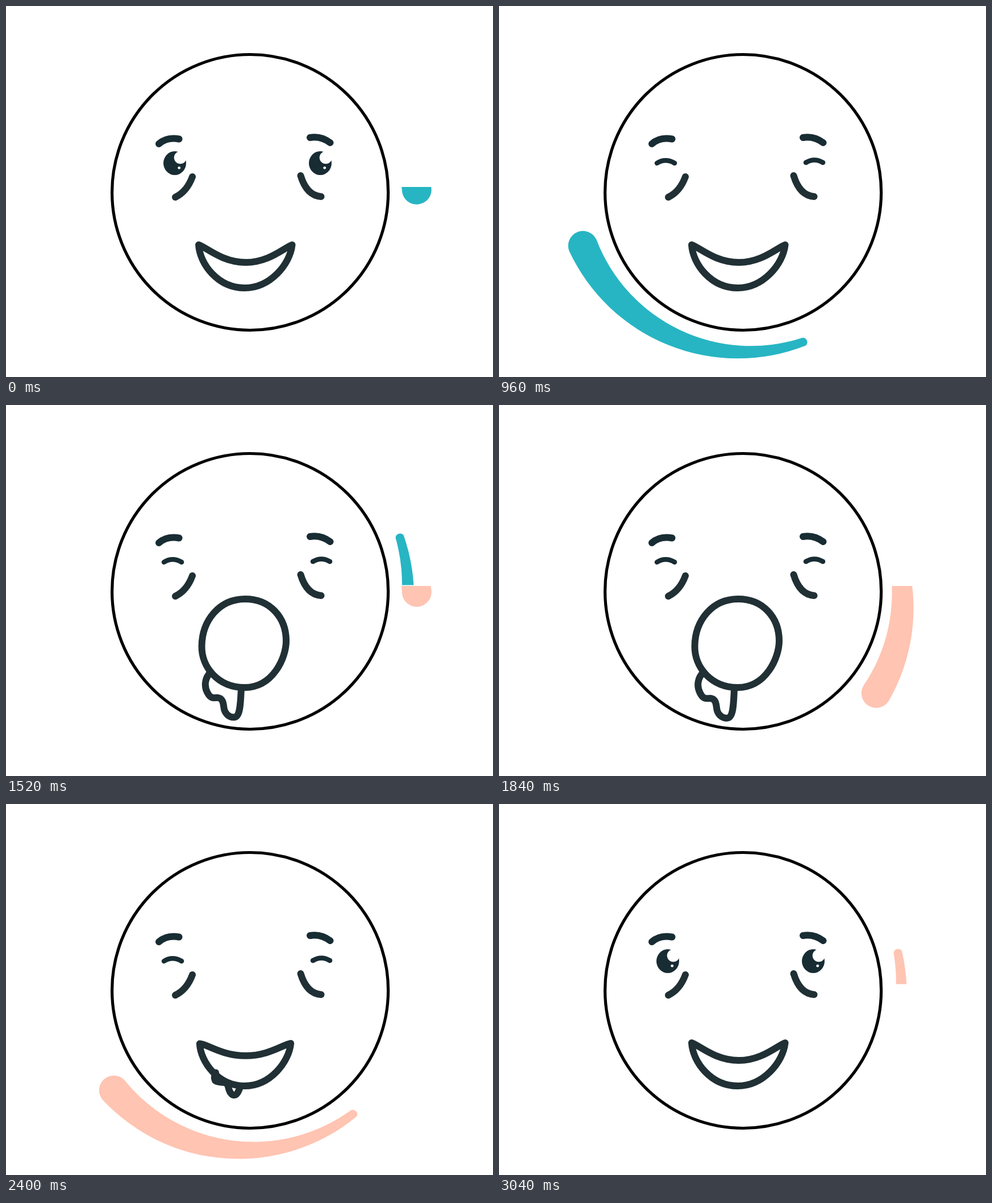
Write an HTML page that moves like this. It is 857 by 654 pixels and loops after 3.12 s.

```html
<!DOCTYPE html>
<html lang="en">
<head>
<meta charset="utf-8">
<title>Dizzy face</title>
<style>
  html, body { margin: 0; width: 100%; height: 100%; overflow: hidden; background: #fff; }
  svg { display: block; width: 857px; height: 654px; }
  .line { fill: none; stroke: #203035; stroke-width: 12; stroke-linecap: round; stroke-linejoin: round; }
  .brow { stroke: #182c33; }
  .lid { stroke: #182c33; stroke-width: 8.5; }
</style>
</head>
<body>
<svg viewBox="0 0 857 654">
  <defs>
    <clipPath id="below"><rect y="319" width="857" height="335"/></clipPath>
    <clipPath id="above"><rect width="857" height="317.5"/></clipPath>
    <path id="band" d="M320.8 3A326.7 326.7 0 0 1-25.3 288.9A8 8 0 0 1-24 274A291 291 0 0 0 269-1A26 26 0 0 1 320.8 3Z"/>
    <g id="eye">
      <ellipse rx="20" ry="21" fill="#182c33"/>
      <circle cx="9.7" cy="-9.7" r="11" fill="#fff"/>
      <circle cx="7.7" cy="8.3" r="2.4" fill="#fff"/>
    </g>
  </defs>

  <g id="teal" fill="#27b5c3"><use href="#band"/></g>
  <g id="pink" fill="#ffc4b2"><use href="#band"/></g>

  <circle cx="429.6" cy="328.5" r="243" fill="none" stroke="#000" stroke-width="5.2"/>

  <path class="line brow" d="M269 243Q283 230.500 304.500 234.500M535 232Q554 228.500 570.500 241"/>
  <path class="line" d="M328 301Q318.500 327 298 337M518.500 299Q529 334 554.500 336"/>
  <g id="open">
    <use href="#eye" x="297" y="277"/>
    <use href="#eye" x="553" y="277"/>
  </g>
  <path id="closed" class="line lid" d="M278 277Q293 267.500 309 277M540 276Q555 267 570 276"/>

  <path id="drool" class="line"/>
  <path id="mouth" class="line"/>
</svg>
<script>
const LOOP = 3120, STEP = 80, PINK_START = 1510;
const $ = id => document.getElementById(id);

// Band head angle in degrees against time in ms
const SWEEP = [[0, -1], [330, 37.3], [560, 71.8], [640, 86.5], [730, 106], [890, 144.3],
  [960, 162.3], [1120, 216.4], [1280, 289.6], [1530, 440.6], [1620, 497]];

const MOUTH = [
  'M339 421C352 425 380 452 422 452C462 452 488 427 503.5 421C500 455 465 497 420 497C373 497 341 455 339 421Z',
  'M352.5 432C353 405 376 391.5 418 391.5C462 391.5 486 405 486 428C486 452 465 497 420 497C378 497 352 458 352.5 432Z',
  'M344.5 425C345 380 375 342 421 342C464 342 493 374 493 416C493 445 470 498 420 498C373 498 344 462 344.5 425Z'
];
const DROOL = [
  'M372 478C373 480 375 482 377 484C380 486 383 488 386 490C389 491 392 493 395 494C398 495 402 497 405 497C408 497 411 497 413 497',
  'M368 472C364 478 363 484 365 489C367 492 374 491 380 491C388 491 389 494 390 501C391 512 395 519 400 519C407 519 409 508 413 497',
  'M360 471C350 480 347 495 354 508C360 520 366 517 372 517C381 518 382 526 383 534C384 545 392 552 401 552C412 552 413 530 414 498'
];

const ramp = (t, from, to) => {
  const x = Math.min(1, Math.max(0, (t - from) / (to - from)));
  return x * x * (3 - 2 * x);
};

// Smooth curve through points, with slopes taken from the neighbours
function curve(points, t) {
  const last = points.length - 1;
  const slope = i => {
    const a = points[Math.max(0, i - 1)], b = points[Math.min(last, i + 1)];
    return (b[1] - a[1]) / (b[0] - a[0]);
  };
  let i = 0;
  while (i < last - 1 && t >= points[i + 1][0]) i++;
  const [t0, y0] = points[i], [t1, y1] = points[i + 1];
  const h = t1 - t0, x = (t - t0) / h, r = 1 - x;
  return y0 * r * r * (1 + 2 * x) + y1 * x * x * (3 - 2 * x)
    + h * x * r * (slope(i) * r - slope(i + 1) * x);
}

// Blend three paths; the middle one is reached at amount = mid
function morph([low, middle, high], amount, mid) {
  const [a, b, k] = amount < mid
    ? [low, middle, amount / mid]
    : [middle, high, (amount - mid) / (1 - mid)];
  const goal = b.match(/[\d.]+/g);
  let i = 0;
  return a.replace(/[\d.]+/g, v => (+v + (goal[i++] - v) * k).toFixed(2));
}

function drawBand(group, t) {
  const visible = t >= 0 && t < 1620;
  group.style.display = visible ? '' : 'none';
  if (!visible) return;
  const angle = curve(SWEEP, t);
  group.firstElementChild.setAttribute('transform', `translate(428 331) rotate(${angle}) scale(1 -1)`);
  group.setAttribute('clip-path', angle < 140 ? 'url(#below)' : angle > 290 ? 'url(#above)' : 'none');
}

function draw(t) {
  drawBand($('teal'), t);
  drawBand($('pink'), t - PINK_START);

  const asleep = t >= 880 && t < 2560;
  $('open').style.display = asleep ? 'none' : '';
  $('closed').style.display = asleep ? '' : 'none';

  const gape = ramp(t, 1040, 1500) - ramp(t, 2000, 2480);
  const drip = ramp(t, 1040, 1570) - ramp(t, 2000, 2640);
  $('mouth').setAttribute('d', morph(MOUTH, gape, 0.55));
  $('drool').setAttribute('d', morph(DROOL, drip, 0.43));
  $('drool').style.display = drip > 0 ? '' : 'none';
}

const start = performance.now();
function tick() {
  const t = (performance.now() - start) % LOOP;
  draw(Math.floor(t / STEP) * STEP);
  requestAnimationFrame(tick);
}
tick();
</script>
</body>
</html>
```
